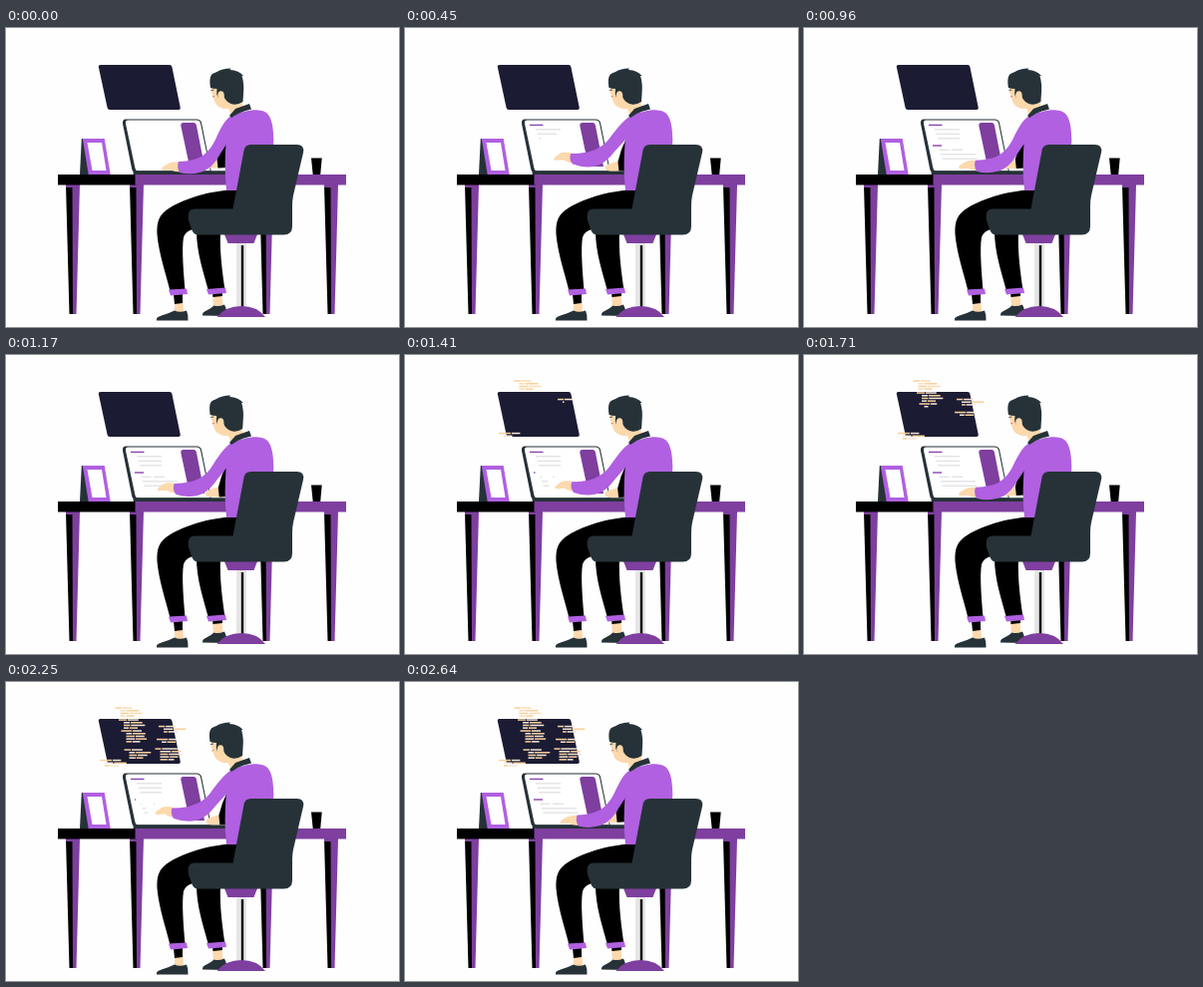
These frames come from a looping animation (394x300 px, 2670 ms). An HTML page:

```html
<!DOCTYPE html>
<html lang="en">
<head>
<meta charset="utf-8">
<title>Developer at a desk</title>
<style>
  html, body { margin: 0; width: 100%; height: 100%; overflow: hidden; background: #fefefe; }
  svg { display: block; width: 100vw; height: 100vh; }
  .dark { fill: #263238; }
  .lilac { fill: #b060e0; }
  .plum { fill: #7e3f9f; }
  .skin { fill: #fcd9ad; }
</style>
</head>
<body>
<svg viewBox="0 0 394 300">
  <rect width="394" height="300" fill="#fefefe"/>

  <!-- floating code window -->
  <path fill="#1b1b33" d="M95 37H164Q166 37 166.400 39L174.800 80Q175 82 173 82H104Q102 82 101.600 80L92.800 39Q92.500 37 95 37Z"/>
  <g id="code"></g>

  <!-- desk -->
  <g id="legs"></g>
  <path d="M52 147H131V157.500H52Z"/>
  <path class="plum" d="M129.500 147H341V157.500H129.500Z"/>
  <path d="M306 130.500H316.700L315.200 147H307.700Z"/>

  <!-- picture frame -->
  <path class="dark" d="M75.800 111H78L84 147H74Z"/>
  <path class="lilac" d="M76.800 111H98.700L104.700 147H82.700Z"/>
  <path fill="#fff" d="M81.500 115H96L100.500 143H86.500Z"/>

  <!-- laptop -->
  <path class="dark" d="M120 91.500H191Q195 91.500 196 95L206 145H130Q127 145 126.300 142L117 96Q116.500 91.500 120 91.500Z"/>
  <path fill="#fff" d="M122.500 92.600H191Q194.400 92.600 195.100 96L204.800 143.500H132.500Q130 143.500 129.300 140L120 96Q119.500 92.600 122.500 92.600Z"/>
  <path class="plum" d="M178 95H188Q190.500 95 191 98L199 139H184L175.300 98Q175 95 178 95Z"/>
  <g id="page"></g>
  <path class="dark" d="M129 143.300H220V147H128Q126.500 145 129 143.300Z"/>

  <!-- legs of the sitter -->
  <path class="skin" d="M169 275L177.500 274L178 285L169 286ZM207 268L216.500 267L217.500 279L208 281Z"/>
  <path d="M168 267H177V276L169 277ZM207 265H217V269L207.500 270Z"/>
  <path class="dark" d="M151 293.500Q150 290 156 288.500Q164 286 169 283.500Q174 286 181 283.500Q183 288 182.500 293.500Z"/>
  <path class="dark" d="M197 288.500Q196.500 285 201 283.500Q206 281 208.500 278.500Q213 280 219 277.500Q222 284 221.500 289Z"/>
  <path d="M191 204L215 204C214 225 217 245 219.500 263L203 264C198 245 191 225 191 204Z"/>
  <path d="M233 162C208 162.500 181 170 164 180.500C153 187 151 195 151.500 207C153.500 228 160 245 164.500 264L179.500 263C178 245 176 222 178 210C180 204 186 201 196 201L236 195Z"/>
  <path class="lilac" d="M163 262.500L181 261.500L182 267L165 268.500ZM201 262L220 260.500L221 266L203 267.500Z"/>

  <!-- chair stand -->
  <path fill="#e6e6e6" d="M231 215H241V281H231Z"/>
  <path d="M235.800 218H238.200V281H235.800Z"/>
  <path class="plum" d="M219 207H252L248.500 216H222.500Z"/>
  <path class="plum" d="M211.500 290Q220 279 236 279Q252 279 260 290Z"/>

  <!-- upper body -->
  <g id="farArm">
    <path class="skin" d="M218 134Q210 133.500 206 136Q201 137.500 200.500 140Q201 143 205 143.500H218Z"/>
    <path d="M223 108L217 122L213.500 134Q214 139 214.500 143.500L224 143Z"/>
  </g>
  <path class="lilac" d="M226 88C236 84 249 81 256 83C264 84.500 268 92 268.300 112L266 163H221C219 146 219.500 130 220.500 115Z"/>
  <path id="hand" class="skin"/>
  <path id="arm" class="lilac"/>

  <g id="head">
    <path class="skin" d="M206 57L205.500 64L207.500 70Q209 77 213 79Q218 82 223 81L225 87L237 79L234 60Z"/>
    <path class="dark" d="M204.500 60C203.500 53 203.500 47 207.500 45.500L211 44Q216 40.500 225 40.500L224 42Q233 42.500 237.500 48L236 48Q238.500 56 237.500 66L237 74Q231 78 225 76Q220 74 218 69L212 70Q210 66 211 61Q207 61 204.500 60Z"/>
    <ellipse class="skin" cx="215" cy="68" rx="3.300" ry="4.800"/>
    <path fill="none" stroke="#263238" stroke-width=".8" d="M205 62.500L208 62"/>
    <path fill="none" stroke="#d9534f" stroke-width=".8" d="M206.500 69L208.500 68.500"/>
  </g>
  <path class="dark" d="M224 88L230 81L244 76L246 81.500Q234 84 226 90Z"/>

  <!-- chair -->
  <path class="dark" transform="translate(-.5 0)" d="M246 117H292Q300 117 298.500 125L288.500 168Q287.500 173 287.500 178V199Q287.500 207.500 279 207.500H193Q189 207.500 187 203L183.500 193Q181.500 181.500 190 181.500H228L239 123Q240 117 246 117Z"/>
</svg>

<script>
const LOOP = 2670, SWING = LOOP / 3;
const $ = id => document.getElementById(id);
const clamp = v => Math.max(0, Math.min(1, v));

function add(parent, tag, attrs) {
  const el = document.createElementNS("http://www.w3.org/2000/svg", tag);
  for (const k in attrs) el.setAttribute(k, attrs[k]);
  return parent.appendChild(el);
}

let seed = 11;
function random() {
  seed = seed * 16807 % 2147483647;
  return seed / 2147483647;
}

// tapered desk legs, dark face and lit face
for (const x of [60, 124, 254, 319]) {
  add($("legs"), "path", { d: `M${x} 157h8l-.5 130h-4z` });
  add($("legs"), "path", { class: "plum", d: `M${x} 157h14l-3.5 130h-3.5l-.5 -127h-6.500z` });
}

// code blocks: indent, top, row count, start time
const bars = [];
function codeBlock(x, y, count, start) {
  for (let i = 0; i < count; i++) {
    const left = i ? x : x - 5;
    const width = i < count - 1 ? 17 + 6 * random() : 14;
    const cut = width * (.3 + .3 * random());
    const white = y > 37 ? "#f6e6d8" : "#fbdcb4";
    const bar = (from, w, fill) => bars.push({
      w, start: start + 55 * i + from * 4,
      el: add($("code"), "rect", { x: left + from, y: y + 2.7 * i - .7, height: 1.5, fill })
    });
    bar(0, cut - .8, i % 2 ? white : "#fbd09a");
    bar(cut, width - cut, i % 2 ? "#fbd09a" : white);
  }
}
codeBlock(114.5, 26, 4, 1180);
codeBlock(118, 38, 4, 1440);
codeBlock(120.500, 49, 5, 1640);
codeBlock(123.5, 68, 4, 1950);
codeBlock(158, 44.500, 3, 1350);
codeBlock(156, 57.5, 2, 1560);
codeBlock(154.500, 67, 5, 1800);
codeBlock(99, 78.5, 3, 1320);

// page: a heading and three lines, twice; the lower half is retyped every swing
const page = [];
function pageLine(x, y, w, heading) {
  page.push({ w, el: add($("page"), "rect", {
    x, y: y - .7, height: 1.4, fill: heading ? "#8a45b0" : "#e3e3e6"
  }) });
}
pageLine(125, 97.4, 13.5, true);
for (let i = 0; i < 3; i++) pageLine(131 + 1.5 * i, 101.8 + 4.5 * i, 25 - 1.5 * i);
pageLine(129, 118, 9, true);
pageLine(135.5, 122.3, 10);
pageLine(148, 122.3, 11);
for (let i = 0; i < 2; i++) pageLine(137 + 1.5 * i, 126.8 + 4.4 * i, 35);

// blend two paths with the same commands
function blend(a, b, k) {
  const nums = b.match(/[\d.]+/g);
  let i = 0;
  return a.replace(/[\d.]+/g, n => (+n + (nums[i++] - n) * k).toFixed(2));
}
const armBack = "M229 87C220 89 215 101 210 112C204 124 197 130 188 132Q181 134 173 134Q171 140 174 145Q184 148 196 144.5C206 141 211 133 215 126L222 115L238 98Z";
const armOut = "M229 87C222 89 213 100 205.5 110C200 118 192 122 183 124.500Q174 126 166 126Q164 132 168 136.500Q180 141 191 138.5C200 136 205 130 210 124L221 112L238 98Z";
const handBack = "M175 134.500Q167 133.500 162 136.500L157 139.500Q155 142 158 143L166 142.500Q169 145 175 144Z";
const handOut = "M169 126Q161 123.500 156 125L150 129.500Q148 132 151 132.500L159 132Q162 135 169 135.500Z";

function draw(t) {
  const phase = t % SWING / SWING;
  const reach = 1 - Math.abs(2 * phase - 1);
  const rest = 1 - reach;
  $("arm").setAttribute("d", blend(armBack, armOut, reach));
  $("hand").setAttribute("d", blend(handBack, handOut, reach));
  $("farArm").setAttribute("transform", `translate(${-2 * rest} ${-3 * rest})`);
  $("head").setAttribute("transform", `translate(${.5 * rest} 0)`);

  const retype = clamp(Math.abs(phase - .55) / .2);
  page.forEach(({ el, w }, i) => {
    const typed = clamp((t - 200 - 80 * i) / 110);
    el.setAttribute("width", w * typed * (i < 4 ? 1 : retype));
  });
  for (const { el, w, start } of bars)
    el.setAttribute("width", Math.min(w, Math.max(0, t - start) / 4));
}

const begin = performance.now();
function tick() {
  draw((performance.now() - begin) % LOOP);
  requestAnimationFrame(tick);
}
draw(0);
requestAnimationFrame(tick);
</script>
</body>
</html>
```
